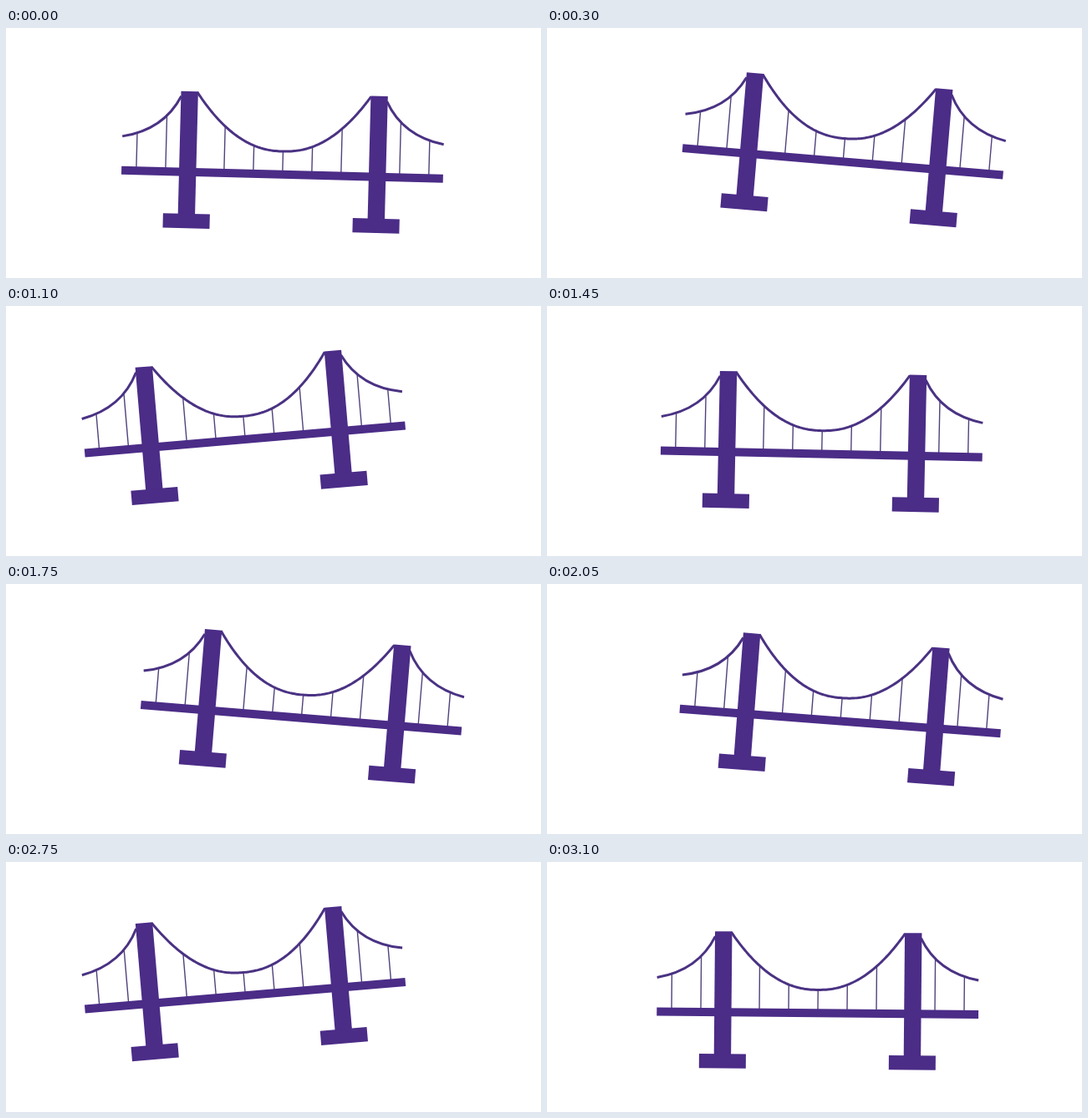
These frames come from a looping animation (640x300 px, 3150 ms). An HTML page with a canvas:

```html
<!DOCTYPE html>
<html lang="en">
<head>
<meta charset="utf-8">
<title>Rocking bridge</title>
<style>
  html, body { margin: 0; width: 100%; height: 100%; overflow: hidden; background: #fff; }
  canvas { display: block; }
</style>
</head>
<body>
<canvas id="stage" width="640" height="300"></canvas>
<script>
const ctx = document.getElementById('stage').getContext('2d');
const LOOP = 3150, STEP = 50;
const REACH = 34.2, LIFT = 25, TILT = 0.143;
const PURPLE = '#4b2c87', CABLE = '#4a3283', HANGER = '#50427c';

// Times at which the bridge passes upright; it swings right first, then left
const upright = [-76, 820, 1385, 2350, 3074, 3970];

function poseAt(t) {
  const i = upright.findIndex(end => t < end) - 1;
  const u = (t - upright[i]) / (upright[i + 1] - upright[i]);
  const s = Math.sin(Math.PI * u);
  const r = s * (1.15 - 0.15 * s ** 4);
  const x = (i % 2 ? -1 : 1) * REACH * r;
  // It hops up quickly on the way out and settles softly on the way back
  const y = -LIFT * Math.pow(r, u < 0.5 ? 0.84 : 1.77);
  return { x, y, angle: x * TILT * Math.PI / 180 };
}

// Bridge coordinates: origin at the middle of the deck
const mainCable = x => -27.8 - 67 * Math.pow(Math.abs(x) / 103, 2.2);

function drawHangers() {
  ctx.strokeStyle = HANGER;
  ctx.lineWidth = 1.4;
  ctx.beginPath();
  for (let x = -175; x <= 175; x += 35) {
    const d = Math.abs(x);
    if (d === 105) continue;
    const top = d < 105 ? mainCable(x) : d === 140 ? -66 : -46;
    ctx.moveTo(x + 0.4, top);
    ctx.lineTo(x + 0.4, -4);
  }
  ctx.stroke();
}

function drawCables() {
  ctx.strokeStyle = CABLE;
  ctx.lineWidth = 3;
  ctx.beginPath();
  for (const dir of [-1, 1]) {
    ctx.moveTo(dir * 192.3, -41);
    ctx.quadraticCurveTo(dir * 143, -50, dir * 123, -91);
  }
  ctx.moveTo(-104, mainCable(104));
  for (let x = -102; x <= 104; x += 2) ctx.lineTo(x, mainCable(x));
  ctx.stroke();
}

function drawBridge() {
  drawHangers();
  drawCables();
  ctx.fillStyle = PURPLE;
  ctx.fillRect(-192.3, -5, 384.8, 10);
  for (const x of [-113.2, 113.8]) {
    ctx.fillRect(x - 10.2, -97, 20.4, 148);
    ctx.fillRect(x - 28, 50, 56, 17.3);
  }
}

function frame(now) {
  const t = Math.floor((now % LOOP) / STEP) * STEP;
  const pose = poseAt(t);
  ctx.setTransform(1, 0, 0, 1, 0, 0);
  ctx.fillStyle = '#fff';
  ctx.fillRect(0, 0, 640, 300);
  ctx.translate(320 + pose.x, 185 + pose.y);
  ctx.rotate(pose.angle);
  drawBridge();
}

let start;
function tick(now) {
  if (start === undefined) start = now;
  frame(Math.max(0, now - start));
  requestAnimationFrame(tick);
}
frame(0);
requestAnimationFrame(tick);
</script>
</body>
</html>
```
